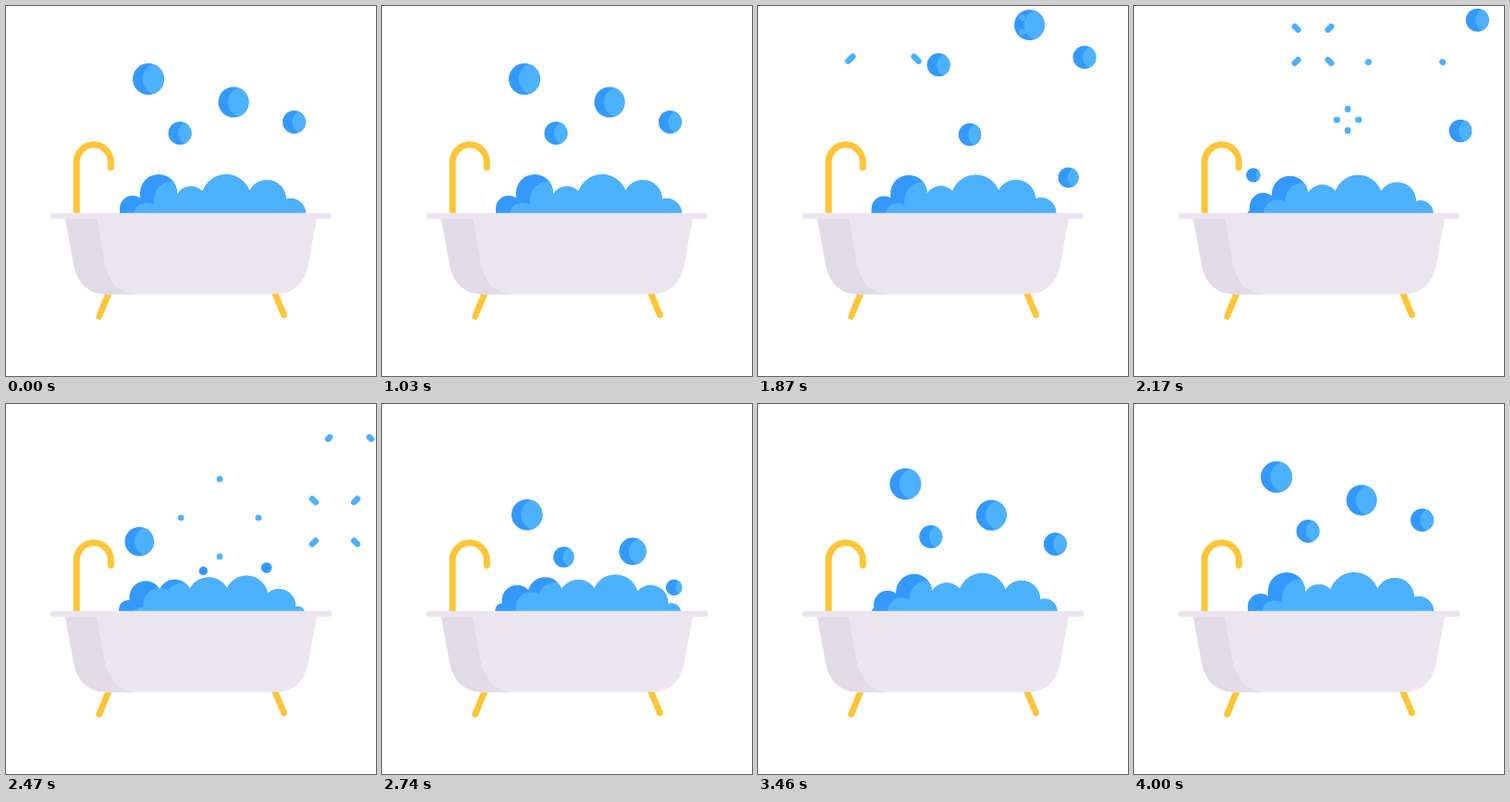
Animation of 400 by 400 pixels, one loop 4030 ms. Source, as an HTML page with a canvas:

```html
<!DOCTYPE html>
<html lang="en">
<head>
<meta charset="utf-8">
<title>Bubble bath</title>
<style>
html, body { margin: 0; width: 100%; height: 100%; overflow: hidden; background: #fff; }
canvas { display: block; width: 100vmin; height: 100vmin; }
</style>
</head>
<body>
<canvas width="400" height="400"></canvas>
<script>
const ctx = document.querySelector('canvas').getContext('2d');
const LOOP = 4030, START = 1030, END = 4000, BURST = 400;
const DARK = '#3399ff', LIGHT = '#4cb1ff', GOLD = '#ffc536', TUB = '#ebe5f0', SHADE = '#e0dbe6';

// Paths run from birth to burst as [time, x, y]; at time 0 a bubble rests until the loop starts moving.
const bubbles = [
  { r: 17, reach: 66, path: [[-1920, 125, 192], [-960, 163, 99.5], [0, 154, 79], [480, 139, 42], [635, 135.5, 21.5]] },
  { r: 16.5, reach: 58, path: [[-1595, 284, 181], [-960, 261.5, 142], [0, 246, 104], [480, 268, 65], [800, 293.5, 20.5]] },
  { r: 12.5, reach: 44, path: [[-1600, 217, 184], [-960, 186, 153], [0, 188, 137.5], [480, 198, 107.5], [1000, 193.5, 42]] },
  { r: 12.5, reach: 34, path: [[-1440, 305, 208], [-960, 328, 182], [0, 311.5, 125.5], [480, 319.5, 90], [840, 353, 55.5], [1145, 371.5, 14.5]] },
  { r: 12.5, reach: 42.3, turn: Math.PI / 4, path: [[260, 268, 188], [840, 229, 139], [1080, 231, 123]] },
  { r: 12.5, reach: 36.8, path: [[520, 318, 212], [840, 335.5, 185.5], [1185, 355.5, 127]] }
];

// Each foam lump [x, y, radius] moves one slot to the left per cycle; the first three slots show a dark side.
const slots = [
  [127, 226, 4], [137, 219, 14], [165, 202, 20], [200, 212, 17],
  [238, 209, 27], [282, 209, 21], [308, 224, 16], [324, 226, 0]
];
const foamCycles = [[0, 0], [480, .22], [840, 1.07], [1440, 2.5], [2010, 2.79], [2970, 3]];

const smooth = u => u * u * (3 - 2 * u);

// Monotone cubic interpolation that stands still at time 0.
function track(keys, t) {
  const last = keys.length - 1;
  if (t >= keys[last][0]) return keys[last].slice(1);
  const i = keys.findIndex(k => k[0] > t) - 1;
  const a = keys[i], b = keys[i + 1], h = b[0] - a[0], u = (t - a[0]) / h;
  const secant = (j, c) => (keys[j + 1][c] - keys[j][c]) / (keys[j + 1][0] - keys[j][0]);
  const slope = (j, c) => {
    if (keys[j][0] === 0) return 0;
    const p = secant(Math.max(j - 1, 0), c), q = secant(Math.min(j, last - 1), c);
    return p * q <= 0 ? 0 : 2 * p * q / (p + q);
  };
  return a.slice(1).map((v, n) => {
    const c = n + 1;
    return v + (b[c] - v) * smooth(u) + h * u * (1 - u) * (slope(i, c) * (1 - u) - slope(i + 1, c) * u);
  });
}

function disc(x, y, r) {
  const path = new Path2D();
  path.arc(x, y, r, 0, 7);
  return path;
}

// A round top on a column that ends behind the tub.
function dome(x, y, r) {
  const path = new Path2D();
  path.arc(x, y, r, Math.PI, 0);
  path.lineTo(x + r, 240);
  path.lineTo(x - r, 240);
  return path;
}

function fill(path, color) {
  ctx.fillStyle = color;
  ctx.fill(path);
}

function stroke(path, color, width) {
  ctx.strokeStyle = color;
  ctx.lineWidth = width;
  ctx.stroke(path);
}

function drawBubble({ r, reach, turn = 0, path }, t) {
  const birth = path[0][0], age = (t - path[path.length - 1][0]) / BURST;
  if (t < birth || age >= 1) return;
  const [x, y] = track(path, t), size = r * (1 - Math.exp((birth - t) / 150));
  if (age < .12) {
    const body = disc(x, y, size);
    fill(body, DARK);
    ctx.save();
    ctx.clip(body);
    fill(disc(x + 10.5, y, size), LIGHT);
    ctx.restore();
  }
  if (age > 0) drawBurst(x, y, reach, turn, age);
}

function drawBurst(x, y, reach, turn, age) {
  const far = reach * (1 - (1 - age) ** 2), half = 3.5 * Math.sin(Math.PI * age) ** 3 + .05;
  const drops = new Path2D();
  for (let i = 0; i < 4; i++) {
    const angle = Math.PI / 4 + turn + i * Math.PI / 2;
    const c = Math.cos(angle), s = Math.sin(angle);
    drops.moveTo(x + c * (far - half), y + s * (far - half));
    drops.lineTo(x + c * (far + half), y + s * (far + half));
  }
  stroke(drops, LIGHT, 6.5 * Math.min(1, (1 - age) * 10));
}

function drawFoam(t) {
  const p = track(foamCycles, t)[0] % 1, growth = p ** 1.3;
  const lumps = slots.slice(1).map((from, i) => {
    const to = slots[i], mix = (n, u) => from[n] + (to[n] - from[n]) * u;
    const shine = i < 2 ? 15 : i === 2 ? 15 * smooth(p) : 0;
    return [mix(0, p), mix(1, growth), mix(2, growth), shine];
  });
  const body = new Path2D();
  lumps.forEach(([x, y, r]) => body.addPath(dome(x, y, r)));
  ctx.save();
  fill(body, DARK);
  ctx.clip(body);
  lumps.forEach(([x, y, r, d]) => fill(dome(x + d, y + d / 2, r), LIGHT));
  ctx.restore();
}

const tap = new Path2D('M76.3 226V168.5a18.5 18.5 0 0 1 37 0V174.5');
const legs = new Path2D('M112 308L100.8 335.5M289.5 308L300.5 334');
const tub = new Path2D('M64 229L73.5 281Q80 311.5 110 311.5H290Q320 311.5 326.5 281L336 229Z');
const shade = new Path2D('M64 230H98L106.5 277Q112.5 309 139 311.5H110Q80 311.5 73.5 281Z');
const rim = new Path2D();
rim.roundRect(48, 223.8, 304, 6.4, 2.5);

function draw(t) {
  const rise = Math.min(0, t - END), flow = Math.max(0, t - START);
  ctx.clearRect(0, 0, 400, 400);
  ctx.lineCap = 'round';
  for (const bubble of bubbles) {
    drawBubble(bubble, rise);
    drawBubble(bubble, flow);
  }
  drawFoam(flow);
  stroke(tap, GOLD, 7);
  stroke(legs, GOLD, 6.8);
  fill(tub, TUB);
  fill(shade, SHADE);
  fill(rim, TUB);
}

let begin;
function tick(now) {
  begin ??= now;
  draw((now - begin) % LOOP);
  requestAnimationFrame(tick);
}
requestAnimationFrame(tick);
</script>
</body>
</html>
```
